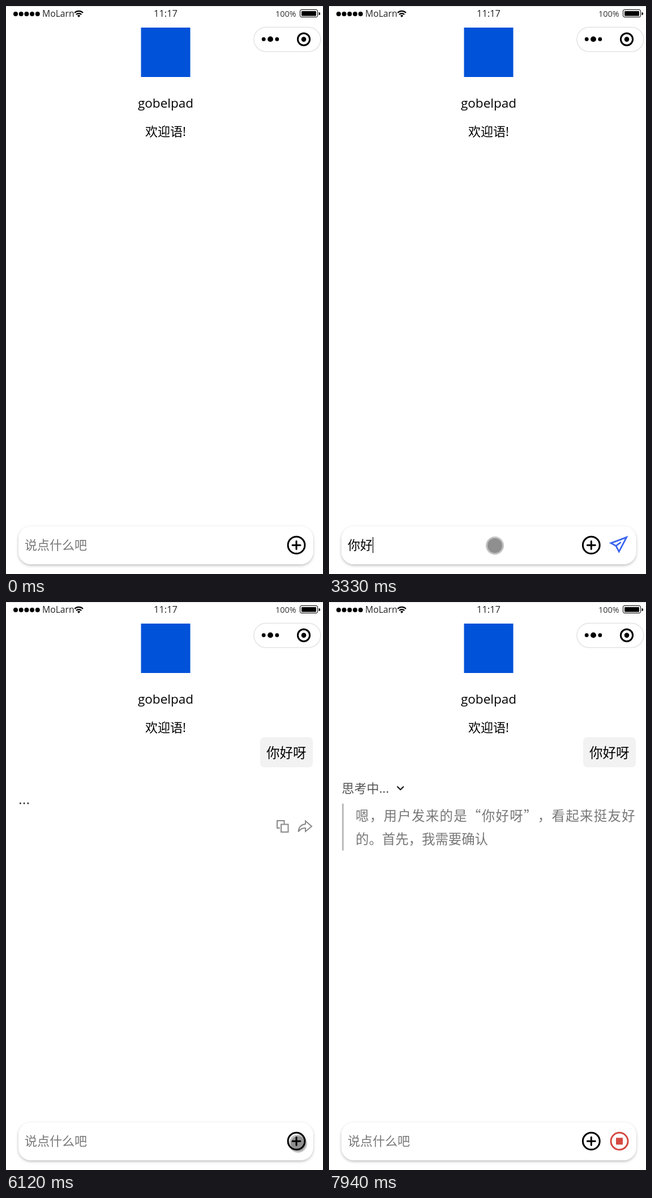
Animation, 560 px wide and 1000 px high, one loop 8 s. Source, as an HTML page:

```html
<!DOCTYPE html>
<html lang="zh-CN">
<head>
<meta charset="utf-8">
<title>Chat demo</title>
<style>
html, body { margin: 0; width: 100%; height: 100%; overflow: hidden; background: #fff; }
svg { display: block; width: 100vw; height: 100vh; }
text { font-family: 'Open Sans', 'Noto Sans CJK SC', 'Noto Sans CJK', sans-serif; white-space: pre; }
.zh { font-family: 'Noto Sans CJK SC', 'Noto Sans CJK', sans-serif; text-spacing-trim: space-all; }
.line { fill: none; stroke-linejoin: round; stroke-linecap: round; }
.sharp { fill: none; stroke-linejoin: miter; stroke-linecap: butt; }
</style>
</head>
<body>
<svg viewBox="0 0 560 1000" xmlns="http://www.w3.org/2000/svg">
  <defs>
    <filter id="shadow" x="-5%" y="-30%" width="110%" height="160%">
      <feDropShadow dx="0" dy="2" stdDeviation="2.4" flood-color="#000" flood-opacity=".27"/>
    </filter>
    <linearGradient id="tint">
      <stop offset="0" stop-color="#fdfdff"/>
      <stop offset=".45" stop-color="#f9f9ff"/>
      <stop offset=".75" stop-color="#f4f0fb"/>
      <stop offset="1" stop-color="#fff1f0"/>
    </linearGradient>
  </defs>
  <rect width="560" height="1000" fill="#fff"/>
  <rect width="560" height="1" fill="#dedede"/>

  <!-- status bar -->
  <g id="signal"></g>
  <text x="64" y="18.5" font-size="15.7" fill="#222">MoLarn</text>
  <g class="sharp" stroke="#000" stroke-width="2.2">
    <path d="M121.2 12a10.4 10.4 0 0 1 14.8 0M124 15a6.4 6.4 0 0 1 9.2 0"/>
  </g>
  <path d="M126 17a3.6 3.6 0 0 1 5.2 0l-2.6 2.9z"/>
  <text x="282" y="19" font-size="16.4" fill="#222" text-anchor="middle">11:17</text>
  <text x="476" y="19" font-size="14.4" fill="#333">100%</text>
  <rect x="519.5" y="6.5" width="31" height="13" rx="2.5" fill="none" stroke="#000"/>
  <rect x="522" y="9" width="26" height="8.5" rx="1"/>
  <path d="M552.5 11q2.6 0 2.6 2.5t-2.6 2.5z"/>

  <!-- capsule menu -->
  <rect x="437.8" y="37.3" width="118" height="43" rx="21.5" fill="#fff" stroke="#dfdfdf" stroke-width="1.3"/>
  <circle cx="455.2" cy="58.4" r="3.4"/><circle cx="467" cy="58.4" r="4.9"/><circle cx="478.8" cy="58.4" r="3.4"/>
  <circle cx="526" cy="58.6" r="10.6" fill="none" stroke="#000" stroke-width="3"/>
  <circle cx="526" cy="58.6" r="4.3"/>

  <!-- header -->
  <rect x="238.5" y="38" width="87" height="87" fill="#0052d9"/>
  <text x="282" y="178.5" font-size="22.5" text-anchor="middle">gobelpad</text>
  <text x="282" y="229.4" font-size="22" text-anchor="middle">欢迎语!</text>

  <!-- conversation -->
  <g id="bubble">
    <rect x="449" y="238" width="93" height="53" rx="7" fill="#f2f2f3"/>
    <text class="zh" x="460" y="274" font-size="23.5">你好呀</text>
  </g>
  <text id="dots" x="22.3" y="356" font-size="23.4" letter-spacing=".5" fill="#333">...</text>
  <g id="tools" class="sharp" stroke="#8a8a8a" stroke-width="2">
    <path d="M484 398h-5v-13h12.5v5.5M486 391.5h12.5v13.5h-12.5z"/>
    <path d="M529 385.5l11 9.5-11 9v-6q-8-.5-12.5 6.5q1-12.5 12.5-13.5z"/>
  </g>
  <g id="thought">
    <text x="22.5" y="336.4" font-size="22" fill="#555">思考中...</text>
    <path class="line" d="M121 325.3l5.2 5.2 5.2-5.2" stroke="#111" stroke-width="2"/>
    <rect id="bar" x="23" y="355" width="3" fill="#bbb"/>
    <text class="zh" id="row1" y="385" font-size="23.4" fill="#777"></text>
    <text class="zh" id="row2" y="426" font-size="23.4" fill="#777"></text>
  </g>

  <!-- input -->
  <rect x="22" y="916" width="520.5" height="67" rx="22" fill="#fff" filter="url(#shadow)"/>
  <text id="field" class="zh" x="33" y="957.4" font-size="22"></text>
  <rect id="caret" y="935" width="1.2" height="28"/>
  <g id="plus" class="line" stroke="#000" stroke-width="3">
    <circle r="14.9"/>
    <path d="M-7 0h14M0-7v14"/>
  </g>
  <path id="send" class="sharp" d="M525.6 935.4L498 945.6 507 950.6 512.3 960.6zM507 950.6l8.6-6.6" stroke="#3964ee" stroke-width="2.8"/>
  <g id="stop">
    <circle cx="513" cy="949.3" r="15" fill="none" stroke="#d54941" stroke-width="3"/>
    <rect x="507" y="943.3" width="12" height="12" fill="#d54941"/>
  </g>

  <!-- input method popup -->
  <g id="ime">
    <rect id="panel" x=".5" y="963.5" height="50" fill="url(#tint)" stroke="#abc4e4"/>
    <text id="keys" x="17.6" y="988" font-size="20.2" fill="#1f57b0"></text>
    <rect id="mark" y="968.5" width="1.3" height="25" fill="#e0574f"/>
    <g id="side">
      <g id="tip" font-size="16.5">
        <text x="-190.5" y="987" fill="#777">9</text>
        <text class="zh" x="-176.5" y="987" fill="#222">打开智能写作助手</text>
      </g>
      <circle cx="-23.5" cy="981" r="12" fill="#ee6a2a"/>
    </g>
  </g>

  <g id="touch">
    <circle r="16" fill="#000" fill-opacity=".24"/>
    <circle r="13" fill="#000" fill-opacity=".26"/>
  </g>
</svg>
<script>
const LOOP = 8000;
const $ = id => document.getElementById(id);
const show = (id, on) => $(id).setAttribute('display', on ? 'inline' : 'none');
const move = (id, x, y) => $(id).setAttribute('transform', `translate(${x} ${y})`);
const within = (t, a, b) => t >= a && t < b;

// value of the latest [time, value] entry
const latest = (list, t) => list.reduce((v, e) => t >= e[0] ? e[1] : v, null);

const typed = [[0, ''], [3330, '你好'], [4270, '你好呀'], [5940, '']];
const caretOn = [[0, 0], [860, 1], [1390, 0], [1930, 1], [2450, 0], [2990, 1],
  [3870, 0], [4270, 1], [4810, 0], [5380, 1], [5940, 0]];
// popup: keys, left edge, width
const popup = [[1730, ['n', 33.5, 383.5]], [1790, ['ni', 33.5, 383.5]],
  [2590, ["ni'h", 33.5, 558.5]], [2730, ["ni'ha", 33.5, 558.5]], [2790, ["ni'hao", 33.5, 558.5]],
  [3330, null], [3590, ['y', 75.5, 384]], [3790, ['ya', 75.5, 386]], [4270, null]];

const tokens = '嗯|，|用户|发来|的是“|你好呀|”，|看起来|挺友好|的。|首先，|我需要|确认'.split('|');
const FIRST = 20;

for (let i = 0; i < 5; i++) {
  $('signal').insertAdjacentHTML('beforeend', `<circle cx="${17 + i * 9.7}" cy="14" r="4"/>`);
}

// stepped glide between two points
function glide(t, start, span, step, a, b) {
  const k = Math.min(1, Math.floor((t - start) / step) * step / span);
  const e = 1 - (1 - k) ** 2;
  return [a[0] + (b[0] - a[0]) * e, a[1] + (b[1] - a[1]) * e];
}

function touchAt(t) {
  const rest = [293, 950];
  if (within(t, 460, 5010)) return glide(t, 460, 400, 80, [436, 988], rest);
  if (within(t, 5010, 5070)) return [332, 936];
  if (within(t, 5070, 5130)) return [385, 915];
  if (within(t, 5520, 6660)) return glide(t, 5520, 360, 60, [556, 970], [516, 953.5]);
  return null;
}

function row(id, s, pitch) {
  const el = $(id), chars = [...s];
  el.textContent = s;
  el.setAttribute('x', chars.map((_, i) => 47 + i * pitch).join(' '));
}

function drawThought(t) {
  const on = t >= 7160;
  show('thought', on);
  if (!on) return;
  const n = 1 + Math.floor((t - 7160) / 65);
  const s = tokens.slice(0, n).join('');
  const wrapped = s.length > FIRST;
  row('row1', s.slice(0, FIRST), wrapped ? 24.75 : 23.4);
  row('row2', s.slice(FIRST), 23.4);
  $('bar').setAttribute('height', wrapped ? 82.5 : 41.5);
}

function drawPopup(t) {
  const p = latest(popup, t);
  show('ime', p);
  if (!p) return;
  const [keys, x, w] = p;
  move('ime', x, 0);
  move('side', w, 0);
  $('panel').setAttribute('width', w - 1);
  $('keys').textContent = keys;
  $('mark').setAttribute('x', 17.6 + $('keys').getComputedTextLength());
  show('tip', within(t, 2190, 2590) || within(t, 3190, 3330) || t >= 4190);
}

function drawInput(t) {
  const s = latest(typed, t), busy = t >= 6400;
  const field = $('field');
  field.textContent = s || '说点什么吧';
  field.setAttribute('fill', s ? '#000' : '#777');
  show('caret', latest(caretOn, t));
  $('caret').setAttribute('x', s ? 33 + s.length * 22 : 34);
  move('plus', s || busy ? 463.3 : 513, 949.2);
  show('send', s);
  show('stop', busy);
}

function draw(t) {
  drawInput(t);
  drawPopup(t);
  show('bubble', t >= 5940);
  show('dots', within(t, 6000, 7160));
  show('tools', within(t, 6000, 6400));
  drawThought(t);
  const p = touchAt(t);
  show('touch', p);
  if (p) move('touch', p[0], p[1]);
}

const begin = performance.now();
function tick() {
  draw((performance.now() - begin) % LOOP);
  requestAnimationFrame(tick);
}
tick();
</script>
</body>
</html>
```
